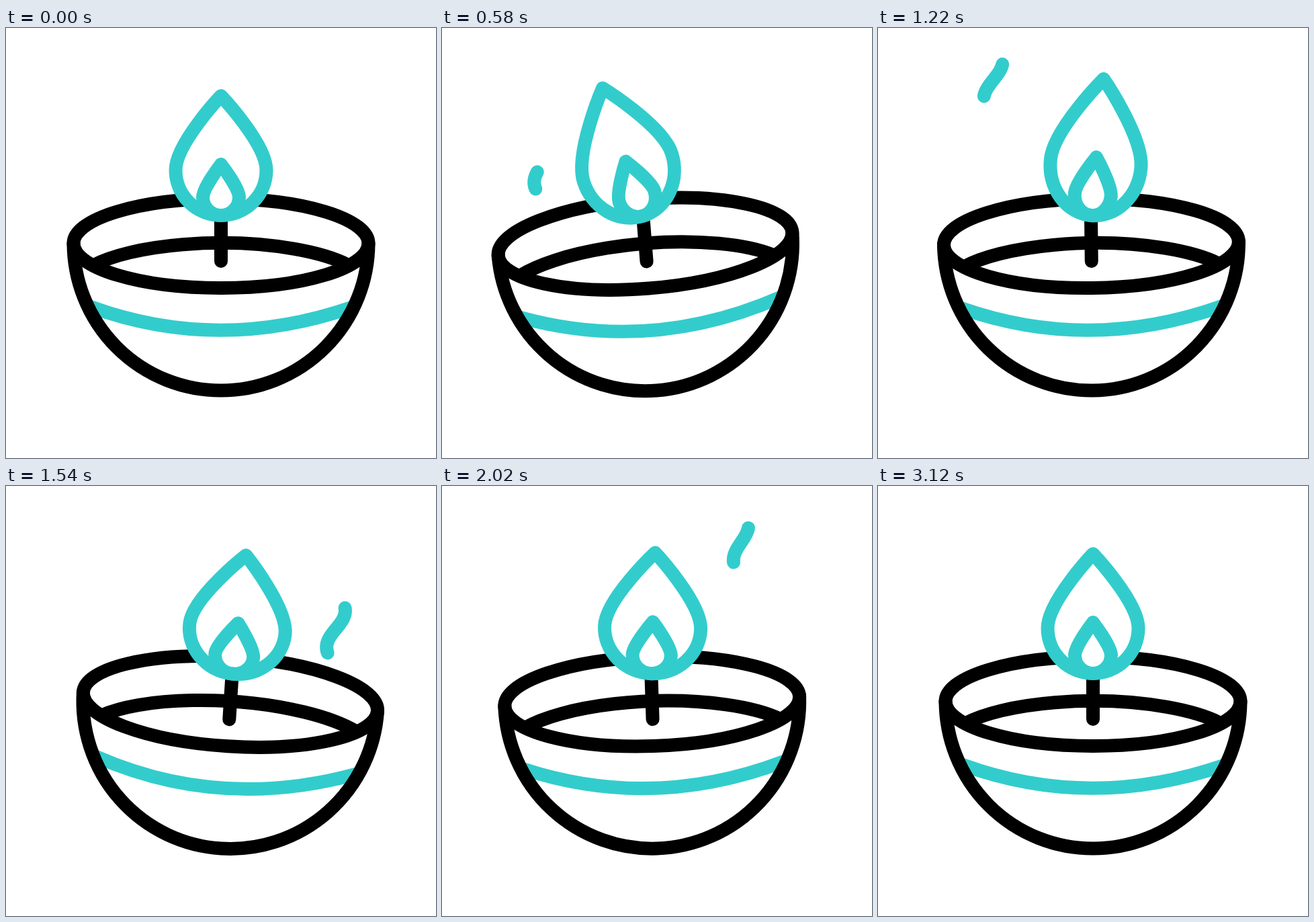
Recreate the animation shown at these times as an HTML page with a canvas. Size 640 px wide and 640 px high, loop 3.6 s.

```html
<!DOCTYPE html>
<html lang="en">
<head>
<meta charset="utf-8">
<title>Oil lamp</title>
<style>
  html, body { margin: 0; width: 100%; height: 100%; overflow: hidden; background: #fff; }
  canvas { display: block; }
</style>
</head>
<body>
<canvas id="stage" width="640" height="640"></canvas>
<script>
const ctx = document.getElementById('stage').getContext('2d');
const LOOP = 3600, TEAL = '#33cccc', BLACK = '#000', RAD = Math.PI / 180;

// Keyframes as [time, value] pairs; angles in degrees.
const SWING = [[195, 0], [900, -8], [1460, 4], [1975, -2], [2300, 0]];
const LEAN = [[0, 0], [560, -13], [1200, 6], [1560, 3], [1980, 4], [2440, -6.5], [3120, 0]];
const TALL = [[0, 1], [430, 1.16], [800, 1.05], [1170, 1.15], [1780, 0.92], [2400, 1.2], [3120, 1]];
const WIDE = [[0, 1], [560, 1.02], [1170, 1], [1780, 1.09], [2400, 1]];
const HEAD = [[500, 226], [1430, 41]];
const TAIL = [[715, 226], [1530, 41]];

const easeInOut = p => (1 - Math.cos(Math.PI * p)) / 2;
const easeOut = p => Math.sin(Math.PI * p / 2);

function at(keys, t, ease = easeInOut) {
  if (t <= keys[0][0]) return keys[0][1];
  for (let i = 1; i < keys.length; i++) {
    const [t0, a] = keys[i - 1], [t1, b] = keys[i];
    if (t < t1) return a + (b - a) * ease((t - t0) / (t1 - t0));
  }
  return keys[keys.length - 1][1];
}

function stroke(color, trace) {
  ctx.beginPath();
  trace();
  ctx.strokeStyle = color;
  ctx.stroke();
}

// Teardrop with its base at the origin; r is the radius of the round end.
function drop(r, height, shoulder) {
  ctx.moveTo(0, -height);
  ctx.bezierCurveTo(0, -height, -r, -shoulder, -r, -r);
  ctx.arc(0, -r, r, Math.PI, 0, true);
  ctx.bezierCurveTo(r, -shoulder, 0, -height, 0, -height);
  ctx.closePath();
}

function bowl() {
  stroke(TEAL, () => {
    ctx.moveTo(126, 415);
    ctx.quadraticCurveTo(316, 484, 514, 416);
  });
  stroke(BLACK, () => ctx.ellipse(320, 386.5, 219.5, 66.5, 0, 210 * RAD, 330 * RAD));
  stroke(BLACK, () => ctx.ellipse(320, 320.5, 219.5, 66.5, 0, 0, 2 * Math.PI));
  stroke(BLACK, () => ctx.arc(320, 320, 219.5, 0, Math.PI));
  stroke(BLACK, () => {
    ctx.moveTo(320, 347);
    ctx.lineTo(320, 275);
  });
}

function flame(t) {
  const shape = (...size) => {
    ctx.save();
    ctx.translate(320, 279);
    ctx.rotate(at(LEAN, t) * RAD);
    ctx.scale(at(WIDE, t), at(TALL, t));
    drop(...size);
    ctx.restore(); // keeps the line weight even
  };
  stroke(TEAL, () => {
    shape(67.5, 178, 107);
    ctx.fill();
  });
  stroke(TEAL, () => shape(27, 76, 41));
}

// A stretch of a rising wave; slant tilts its axis.
function smoke(t, dx, dy, slant) {
  const top = at(HEAD, t, easeOut), bottom = at(TAIL, t);
  if (bottom - top < 0.5) return;
  stroke(TEAL, () => {
    for (let i = 0; i <= 40; i++) {
      const y = bottom + (top - bottom) * i / 40;
      const x = 176 - 14.5 * Math.cos(Math.PI * (y - 218) / 57) + slant * (y - 85);
      ctx.lineTo(x + dx, y + dy);
    }
  });
}

function draw(now) {
  const t = now % LOOP;
  ctx.fillStyle = '#fff';
  ctx.fillRect(0, 0, 640, 640);
  ctx.lineWidth = 20;
  ctx.lineCap = ctx.lineJoin = 'round';
  ctx.save();
  ctx.translate(320, 540);
  ctx.rotate(at(SWING, t) * RAD);
  ctx.translate(-320, -540);
  bowl();
  flame(t);
  smoke(t, 1, 0, 0);
  smoke(t - 815, 285, 13, 0.085);
  ctx.restore();
}

let start;
function frame(now) {
  start ??= now;
  draw(now - start);
  requestAnimationFrame(frame);
}
draw(0);
requestAnimationFrame(frame);
</script>
</body>
</html>
```
